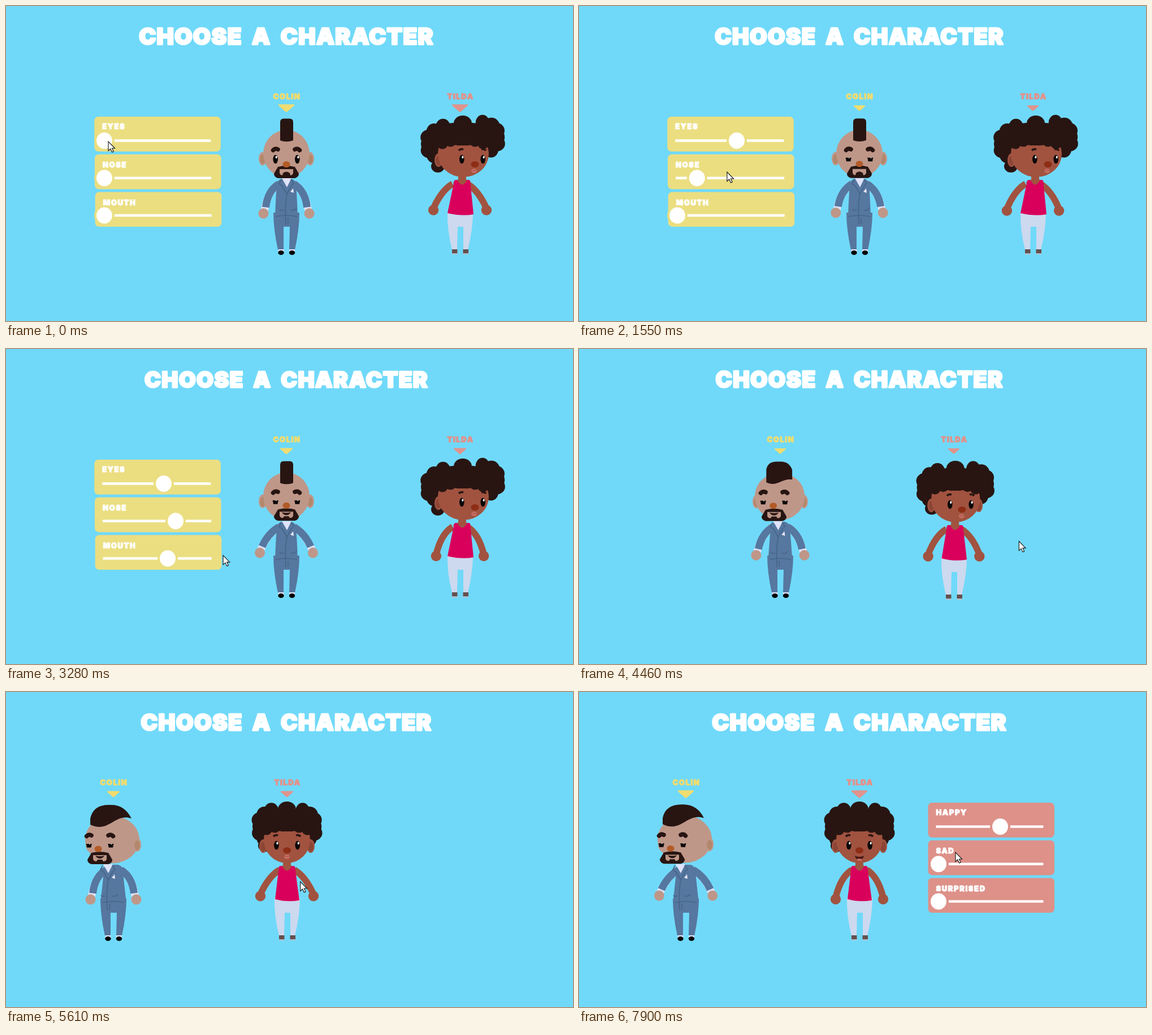
These frames come from a looping animation (1003x558 px, 8 s). An HTML page with a canvas:

```html
<!DOCTYPE html>
<html lang="en">
<head>
<meta charset="utf-8">
<title>Choose a character</title>
<style>
html, body { margin: 0; width: 100%; height: 100%; overflow: hidden; background: #70d9f9; }
canvas { display: block; }
</style>
</head>
<body>
<canvas id="stage" width="1003" height="558"></canvas>
<script>
const g = document.getElementById('stage').getContext('2d');
const LOOP = 8000, STEP = 144.4, FIRST = 105, PICK = 4300, ARRIVE = 5730;
const YELLOW = '#ebde81', ROSE = '#dd9189', DARK = '#281512', BLACK = '#0b0808';
const SUIT = '#56779f', SEAM = '#466589', CUFF = '#dfe3fa', TAN = '#bf9788', BROWN = '#a15340';

const mix = (a, b, k) => a + (b - a) * k;
const clamp = k => Math.max(0, Math.min(1, k));
const wave = (t, period) => Math.cos(t / period * 2 * Math.PI);

class Drag {
  constructor(start, end, from, to, y) { Object.assign(this, { start, end, from, to, y }); }
  // The knob trails the cursor by one step
  progress(t) { return clamp((t - STEP - this.start) / (this.end - this.start)); }
  knob(t) { return mix(this.from, this.to, this.progress(t)); }
  get path() { return [[this.start, this.from + 7, this.y], [this.end, this.to + 7, this.y]]; }
}
const eyesDrag = new Drag(150, 750, 174, 279, 240);
const noseDrag = new Drag(1296, 1690, 174, 300, 294);
const mouthDrag = new Drag(2600, 3050, 174, 286, 371);
const happyDrag = new Drag(6500, 7000, 636, 745, 240);
const cursorPath = [...eyesDrag.path, ...noseDrag.path, ...mouthDrag.path,
  [4340, 800, 341], [5600, 519, 336], [6320, 666, 250], ...happyDrag.path, [7900, 666, 284]];

function cursorAt(t) {
  const i = cursorPath.findIndex(p => p[0] > t);
  if (i < 1) return cursorPath.at(i).slice(1);
  const [t0, x0, y0] = cursorPath[i - 1], [t1, x1, y1] = cursorPath[i];
  const k = (t - t0) / (t1 - t0);
  return [mix(x0, x1, k), mix(y0, y1, k)];
}

function oval(x, y, rx, ry, color) {
  g.fillStyle = color;
  g.beginPath();
  g.ellipse(x, y, rx, ry, 0, 0, 7);
  g.fill();
}
function fill(d, color) {
  g.fillStyle = color;
  g.fill(new Path2D(d));
}
function line(d, color, width, cap = 'butt') {
  g.strokeStyle = color;
  g.lineWidth = width;
  g.lineCap = cap;
  g.stroke(new Path2D(d));
}
function shifted(x, y, draw, scale = 1) {
  g.save();
  g.translate(x, y);
  g.scale(scale, scale);
  draw();
  g.restore();
}
function text(s, x, y, color, align = 'left', size = 13, spacing = 1.6, weight = 1.1) {
  g.font = `900 ${size}px Inter, sans-serif`;
  g.letterSpacing = spacing + 'px';
  g.textAlign = align;
  g.lineJoin = 'round';
  g.fillStyle = g.strokeStyle = color;
  g.lineWidth = weight;
  g.strokeText(s, x, y);
  g.fillText(s, x, y);
}

function title(t) {
  shifted(495.5, 53.5, () => {
    g.wordSpacing = '8px';
    text('CHOOSE A CHARACTER', 0.5, 14.7, '#fff', 'center', 40.4, 1.3, 3);
  }, 0.975 + 0.025 * wave(t, 1975));
}

function nameTag(name, color, t) {
  text(name, 1, 164.5, color, 'center');
  shifted(0, 180.7, () =>
    fill('M-13 -6.5H13Q15 -6 13.5 -4L2 6Q0 8 -2 6L-13.5 -4Q-15 -6 -13 -6.5Z', color),
    0.86 + 0.14 * wave(t, 987));
}

function panel(x, row, label, color, lineLength, knob) {
  const cy = 238.5 + 66.3 * row;
  g.fillStyle = color;
  g.beginPath();
  g.roundRect(x, 196 + 66.7 * row, 223.5, 61.7, 7);
  g.fill();
  text(label, x + 14, 218 + 67.5 * row, '#fff');
  line(`M${x + 14} ${cy}h${lineLength}`, '#fff', 4.5);
  oval(knob, cy, 18, 18, color);
  oval(knob, cy, 14, 14.5, '#fff');
}

function arm(side, hx, hy, color, width) {
  line(`M${side * 13} 315Q${side * 33} 327 ${hx} ${hy}`, color, width);
}

function ear(x, y, inner) {
  oval(x, y, 7, 12, inner === BROWN ? BROWN : TAN);
  oval(x, y + 1, 4.6, 8.5, inner === BROWN ? '#8b4535' : inner);
}

function eye(x, open) {
  g.save();
  g.beginPath();
  g.rect(x - 8, mix(269, 262, open), 16, mix(6.5, 20, open));
  g.clip();
  oval(x, 271.5, 4.3, 7.8, BLACK);
  oval(x + 1.5, 267.8, 1.5, 2.4, '#fff');
  g.restore();
  if (open < 0.4) line(`M${x - 5} 270h3M${x + 2} 270h3`, BLACK, 2);
}

// Characters are drawn around x = 0; turn runs from -1 (left) to 1 (right)
function manBody(turn, sway) {
  fill('M-23 366Q-23 395 -15 432H-5L-5 391H6L5 432H15Q23 395 23 366Z', SUIT);
  for (const x of [-9.5, 10]) {
    fill(`M${x - 5} 431h10v4h-10Z`, CUFF);
    oval(x, 437, 5.2, 4, '#050505');
  }
  for (const s of [-1, 1]) {
    const hx = s * (40.5 + 8 * sway), hy = 367.5 - 8 * sway;
    arm(s, hx - s * 2, hy - 6, CUFF, 13);
    arm(s, hx - s * 4, hy - 11, SUIT, 13);
    oval(hx, hy, 9, 9.2, TAN);
  }
  const w = 20 - 3 * turn;
  fill(`M-8 306Q-17 308 -17 318Q-19 340 -${w} 374H${w}Q19 340 17 318Q17 308 8 306Z`, SUIT);
  line('M-19 373Q0 369 19 373', SEAM, 1.6);
  shifted(10 * turn, 0, () => {
    fill('M-8 305H9L1 321Z', CUFF);
    line('M-9 307L-13 315L-8 318L1 333L9 318L13 314L8 307M1 333Q-3 352 -1 387', SEAM, 1.7);
    line('M-12 360Q-9 364 -5 361M8 361Q13 364 18 358M3 375V386', SEAM, 1.6);
    fill('M7 329L12 323L13 331Z', '#e9e6fb');
  });
}

function mohawk(side) {
  const m = (a, b) => mix(a, b, side);
  const left = m(-11, -41), right = m(12, 32), top = m(199.5, 200), base = m(238, 235), back = m(238, 224);
  fill(`M${left} ${base}L${left} ${m(206, 224)}Q${m(-11, -36)} ${top} ${m(-5, -8)} ${top}
    H${m(6, -4)}Q${m(12, 20)} ${top} ${right} ${m(206, 224)}V${back}
    C${m(4, 2)} ${m(241, 214)} ${m(-4, -8)} ${m(241, 251)} ${left} ${base}Z`, DARK);
}

function manHead(turn, eyes, nose, mouth) {
  const side = -turn, inner = '#b2876b';
  ear(-42, 270.5, inner);
  ear(42, 270.5, inner);
  oval(-2 * side, 261.5, 41 + 7 * side, 42, TAN);
  if (side > 0.6) ear(42, 270.5, inner);
  mohawk(side);
  shifted(24 * turn, 0, () => {
    for (const s of [-1, 1]) {
      eye(s * 19.3, 1 - eyes);
      line(`M${s * 23.5} 255.5Q${s * 20} 251.5 ${s * 15} 254`, DARK, 7.5, 'round');
    }
    fill('M-15 285Q0 281 15 285Q18 290 22 297Q22 303 15 305H-15Q-22 303 -22 297Q-18 290 -15 285Z', DARK);
    fill('M-12 289H12V296Q11 300 6 300L4 297H-4L-6 300Q-11 300 -12 296Z', TAN);
    if (mouth < 0.5) fill('M-8 304L-6 296Q0 291 6 296L8 304Z', DARK);
    else fill('M-8 290Q0 292 8 290Q5 295 0 295Q-5 295 -8 290Z', DARK);
    oval(3 * turn, 280.5 - 2.5 * nose, 6.5, 5.5, '#b35b28');
  });
}

function womanBody(turn, sway) {
  fill('M-22 364Q-23 395 -14 432H-5L-4 391H6L6 432H14Q23 395 23 364Z', '#ccd9ef');
  for (const x of [-9, 10.5]) {
    fill(`M${x - 5} 431h9.5v7h-9.5Z`, '#64504f');
    fill(`M${x - 5} 438h9.5v2h-9.5Z`, '#b7bccb');
  }
  for (const s of [-1, 1]) {
    const hx = s * (41 + 6 * sway), hy = 368 - 6.5 * sway;
    arm(s, hx, hy - 3, BROWN, 11.5);
    oval(hx, hy, 9.2, 9.2, BROWN);
  }
  shifted(4 * turn, 0, () => {
    fill('M-7 300H7V307L15 312L10 325H-12L-16 312L-7 307Z', BROWN);
    fill(`M-14 309Q-9 306 -7 311Q0 322 7 311Q9 306 14 309L${22 - 2 * turn} 369Q0 373 ${-21 - 5 * turn} 367Z`, '#d9005b');
  });
}

// A ring of lobes around the crown, widening and tilting with the turn
function curls(turn) {
  const cx = 5 * turn, width = 49 + 13 * turn;
  oval(cx, 233, width + 5, 27, DARK);
  for (let i = 0; i <= 12; i++) {
    const a = mix(Math.PI + 0.8, -0.8, i / 12), c = Math.cos(a);
    const dx = width * Math.sign(c) * Math.abs(c) ** 0.6;
    oval(cx + dx, 238 - 30 * Math.sin(a) - 0.1 * dx * turn, 14 + 2 * Math.sin(i * 2.4), 14, DARK);
  }
  oval(-39, 272 + 12 * turn, 12, 11, DARK);
}

function womanHead(turn, happy) {
  curls(turn);
  ear(-42 + 4 * turn, 273, BROWN);
  if (turn < 0.7) ear(42 + 4 * turn, 273, BROWN);
  oval(6 * turn, 262, 41 + 4 * turn, 41, BROWN);
  shifted(5 * turn, 0, () => {
    oval(0, 229, 47, 18, DARK);
    for (let x = -36; x <= 36; x += 14.4) oval(x, 237 + x * x / 200, 10, 10, DARK);
  });
  shifted(22 * turn, 0, () => {
    for (const s of [-1, 1]) {
      eye(s * 18.7, 1);
      line(`M${s * 24} 256Q${s * 21} 252.5 ${s * 16} 254`, DARK, 3.6);
    }
    oval(4.5 * turn, 280.5, 7, 5.5, '#8e2d15');
    if (happy < 0.35) {
      oval(3 * turn, 292, 5, 3.8, '#c66f63');
      line(`M${3 * turn - 4} 291.5h8`, '#a64c42', 1);
    } else {
      const w = mix(4, 8.5, happy);
      fill(`M${-w} 290Q0 294 ${w} 290Q5 298 0 298Q-5 298 ${-w} 290Z`, '#45150f');
      oval(0, 297, 4.5, 2, '#c66f63');
    }
  });
}

function cursor(x, y) {
  shifted(x, y, () => {
    const arrow = 'M0 0V16.5L3.8 13L6.6 19L9.3 17.8L6.6 12H11.6Z';
    fill(arrow, '#fff');
    g.lineJoin = 'miter';
    line(arrow, '#111', 1.1);
  });
}

function draw(t) {
  g.fillStyle = '#70d9f9';
  g.fillRect(0, 0, 1003, 558);
  title(t);

  if (t < PICK)
    [['EYES', eyesDrag], ['NOSE', noseDrag], ['MOUTH', mouthDrag]].forEach(([label, drag], row) =>
      panel(156.3 + 0.7 * row, row, label, YELLOW, 192, drag.knob(t)));
  if (t > ARRIVE)
    ['HAPPY', 'SAD', 'SURPRISED'].forEach((label, row) =>
      panel(617.5, row, label, ROSE, 190, row ? 636 : happyDrag.knob(t)));

  const pan = t < PICK ? 0 : 1 - Math.exp((PICK - t) / 225);
  const sway = 0.5 - 0.5 * wave(t - 5600, 1410);
  const dip = 4.5 * Math.sin(Math.PI * clamp((t - PICK) / 400));

  shifted(496 - 307 * pan, 0, () => {
    nameTag('COLIN', '#f0dc6f', t);
    manBody(-pan, sway);
    shifted(0, -sway, () =>
      manHead(-pan, eyesDrag.progress(t), noseDrag.progress(t), mouthDrag.progress(t)));
  });
  shifted(803 - 307 * pan, 0, () => {
    nameTag('TILDA', '#e0938c', t);
    g.translate(0, dip);
    womanBody(1 - pan, 1 - sway);
    womanHead(1 - pan, happyDrag.progress(t));
  });
  cursor(...cursorAt(t));
}

function tick(now) {
  const step = Math.floor((now % LOOP - FIRST + 10) / STEP);
  draw(Math.max(0, FIRST + step * STEP));
  requestAnimationFrame(tick);
}
requestAnimationFrame(tick);
</script>
</body>
</html>
```
